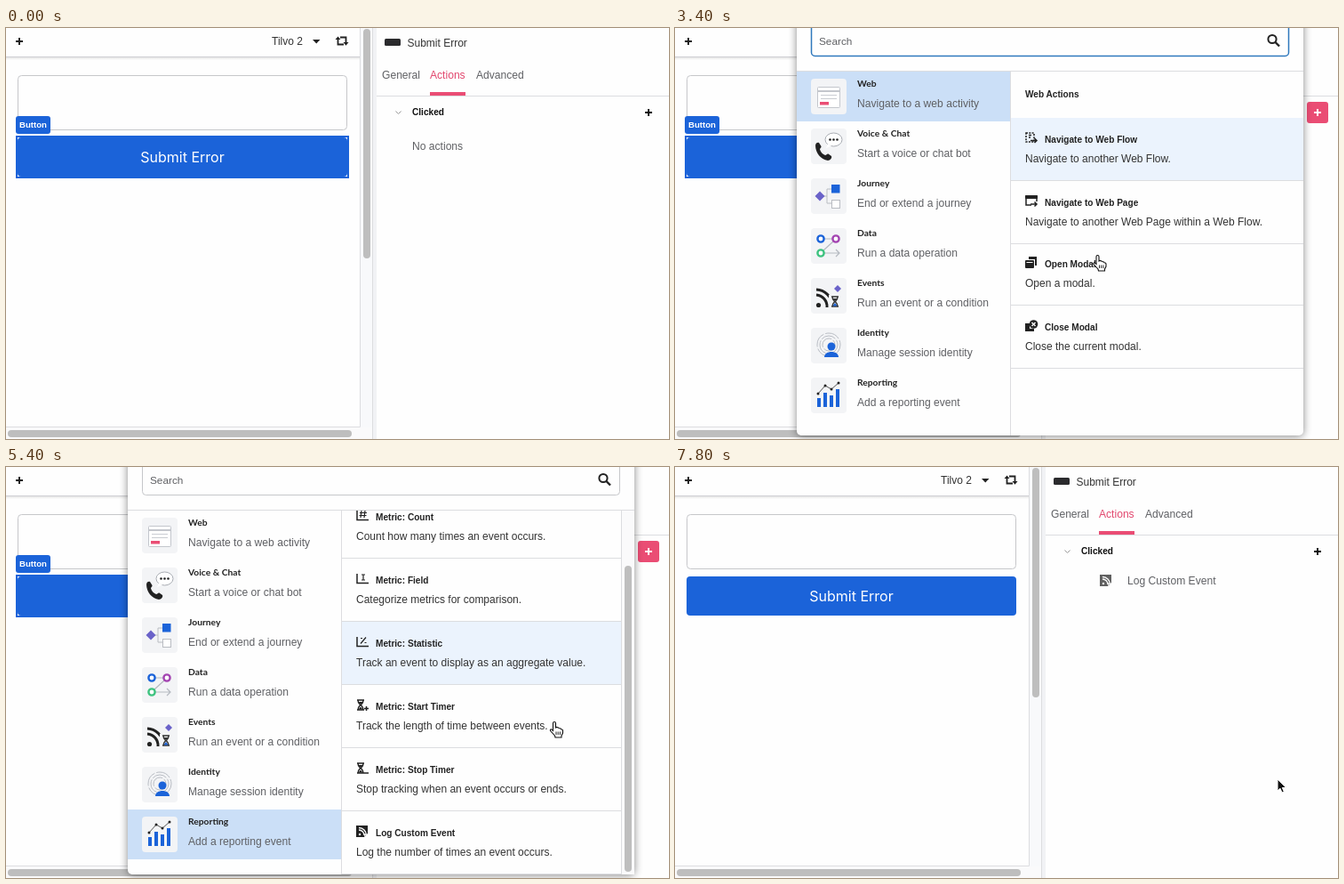
These frames come from a looping animation (746x462 px, 8000 ms). An HTML page:

```html
<!DOCTYPE html>
<html lang="en">
<head>
<meta charset="utf-8">
<title>Adding a log action</title>
<style>
  html, body { margin: 0; width: 100%; height: 100%; overflow: hidden; background: #fefefe; }
  svg { display: block; width: 746px; height: 462px; }
  text { font: 12.1px "Liberation Sans", Arial, sans-serif; fill: #333; white-space: pre; }
  .dim { fill: #5f6064; }
  .bold { font-weight: 700; font-size: 10.1px; fill: #222; }
  .small { font-size: 9.9px; fill: #616161; }
  .category { font: 700 10.3px Lato, sans-serif; fill: #222; }
  .button { font: 16px Inter, sans-serif; fill: #fff; text-anchor: middle; }
  .tag { font-weight: 700; font-size: 9.6px; fill: #fff; }
  .code { font: 11.8px "Liberation Mono", monospace; }
  .fx { font: italic 700 12px "Liberation Serif", serif; }
  .fx tspan { font: 700 8px "Liberation Sans", sans-serif; }
  .line { fill: none; stroke: #dcdde0; }
  .field { fill: #fefefe; stroke: #c6c7ca; }
  .ink { fill: none; stroke: #222; stroke-width: 1.5; }
  .thumb { fill: #bebebe; }
  .sheet { fill: #fefefe; filter: drop-shadow(0 1px 5px #0007); }
</style>
</head>
<body>
<svg id="stage" viewBox="0 0 746 462"></svg>
<script>
const LOOP = 8000, STEP = 200;
const OPEN = 2400, REPORTING = 3800, EDIT = 6200, DONE = 7400;
const BLUE = '#1b63d9', PINK = '#ea4d74', PURPLE = '#6a62c9';

const text = (x, y, s, cls = '', extra = '') => `<text x="${x}" y="${y}" class="${cls}" ${extra}>${s}</text>`;
const rect = (x, y, w, h, fill, r = 0, extra = '') =>
  `<rect x="${x}" y="${y}" width="${w}" height="${h}" rx="${r}" ${fill ? `fill="${fill}"` : ''} ${extra}/>`;
const path = (d, cls = 'ink', extra = '') => `<path d="${d}" class="${cls}" ${extra}/>`;
const shape = (d, fill = '#222') => `<path d="${d}" fill="${fill}"/>`;
const circle = (x, y, r, fill, extra = '') => `<circle cx="${x}" cy="${y}" r="${r}" fill="${fill}" ${extra}/>`;
const group = (id, body, extra = '') => `<g id="${id}" ${extra}>${body}</g>`;
const at = (x, y, body) => `<g transform="translate(${x} ${y})">${body}</g>`;
const plus = (x, y) => `M${x - 4} ${y}h8M${x} ${y - 4}v8`;
const stroke = (color, width = 1) => `style="stroke:${color};stroke-width:${width}"`;

const waves = color => path('M3 5a6 6 0 0 1 6 6M3 2.5a8.5 8.5 0 0 1 8.5 8.5', 'ink', stroke(color, 1.3)) + circle(4, 10, 1.2, color);
const logIcon = color => shape('M0 0H13V9L9 13H0Z', color) + waves('#fff') + shape('M9 13V9H13Z', '#ddd');
const hourglass = (color = '#222') =>
  path('M1 1H9M1 12H9M2 1C2 5 4.5 5 4.5 6.5S2 8 2 12M8 1C8 5 5.5 5 5.5 6.5S8 8 8 12', 'ink', stroke(color, 1.4)) +
  shape('M2.5 3H7.5L5 6ZM2.5 11.5L5 8.5 7.5 11.5Z', color);
const axis = glyph => path('M1 1V11.5H14') + path(glyph, 'ink', stroke('#222', 1.2));

const rowIcons = {
  flow: path('M1 1H10V11H1Z', 'ink', 'stroke-dasharray="2 1.3"') + path('M4 3.5h3M4 6h2') + path('M6 9.5H13M10.5 7L13 9.5 10.5 12'),
  page: path('M7 11H1V1H13V7') + rect(0, 0, 14, 4, '#222', 1) + path('M6 10H13M10.5 7.5L13 10 10.5 12.5'),
  modal: shape('M4 0H13V10H11V3H4Z') + rect(0, 4, 10, 9, '#222', 1) + path('M1.5 6.5h7', 'ink', stroke('#fff')),
  close: shape('M0 4H5V10H10V13H0Z') + circle(9.5, 5, 4.8, '#222') + path('M7.5 3l4 4m0-4l-4 4', 'ink', stroke('#fff', 1.4)),
  count: axis('M6 1L5 9M10 1L9 9M4 3.5h8M3.5 6.5h8'),
  field: axis('M6 2h4M8 2v6M6 8h4'),
  stat: axis('M11 1.5L5 8.5M5 2.5h2M9.5 7.5h2'),
  start: hourglass() + path('M9 10.5h5M11.5 8v5'),
  stop: hourglass() + path('M9 12h5'),
  log: logIcon('#222')
};

const categories = [
  ['Web', 'Navigate to a web activity',
    rect(7.5, 9.5, 25, 23, '#fff', 1, 'stroke="#c3c6cc"') + path('M8 14H32', 'line', stroke('#c3c6cc', 2)) +
    path('M11 18.5H29M11 22.5H29', 'line', stroke('#c9ccd2')) + rect(10, 26, 10, 3.5, PINK)],
  ['Voice &amp; Chat', 'Start a voice or chat bot',
    `<ellipse cx="25.5" cy="12.5" rx="9.5" ry="7.5" fill="#fff" stroke="#a9adb3"/>` + shape('M19 17l-2 5 6-2.5Z', '#fff') +
    [21.5, 25.5, 29.5].map(x => circle(x, 12.5, 1.3, '#222')).join('') +
    shape('M5 19C5 16 8 15 9 16L11.5 20C12 21.5 10 22 10 23.5 11 27 13.5 29 16 30 17.5 30 18 28 19.5 28.5L23 31C24 33 21.5 36 19 36 11 35 5 27 5 19Z')],
  ['Journey', 'End or extend a journey',
    path('M14 20H18M18 12V28M18 12H24M18 28H24', 'line', stroke('#b9bcc2')) + shape('M10 14.5L15.5 20 10 25.5 4.5 20Z', PURPLE) +
    rect(23, 7, 9.5, 9.5, BLUE) + rect(23.5, 24.5, 9, 9, '#fff', 0, 'stroke="#b9bcc2"')],
  ['Data', 'Run a data operation',
    path('M15 12H24M25 15L14 25M15 28H31M28 24L32 28 28 32', 'line', stroke('#b5b9c0', 1.2)) +
    [[11, 12, BLUE], [28, 12, '#a445b2'], [11, 28, '#3fc380']].map(([x, y, c]) => circle(x, y, 3.6, '#fff', `stroke="${c}" stroke-width="2.4"`)).join('')],
  ['Events', 'Run an event or a condition',
    path('M6 19A13 13 0 0 1 18 33M6 13A19 19 0 0 1 24 30', 'ink', stroke('#222', 3)) + circle(8.5, 30.5, 2.6, '#222') +
    rect(20, 19, 14, 16, '#f3f4f6') + shape('M30 8L34 12 30 16 26 12Z', PURPLE) + at(22, 20, hourglass('#333') + shape('M2.5 11.5L5 8 7.5 11.5Z', BLUE))],
  ['Identity', 'Manage session identity',
    [13, 10, 7].map(r => circle(20, 19, r, 'none', 'stroke="#b9bdc4" stroke-dasharray="17 2"')).join('') +
    circle(23, 21, 4.5, BLUE) + shape('M15 33C15 25 31 25 31 33Z', BLUE)],
  ['Reporting', 'Add a reporting event',
    [[7, 10], [14, 16], [21, 13], [28, 20]].map(([x, h]) => rect(x, 33 - h, 4, h, BLUE)).join('') +
    path('M8 18L16 9 23 13 31 6', 'ink', stroke('#555')) +
    [[8, 18], [16, 9], [23, 13], [31, 6]].map(([x, y]) => circle(x, y, 1.5, '#222')).join('')]
];

const webRows = [
  ['flow', 'Navigate to Web Flow', 'Navigate to another Web Flow.', 171],
  ['page', 'Navigate to Web Page', 'Navigate to another Web Page within a Web Flow.', 242],
  ['modal', 'Open Modal', 'Open a modal.', 311],
  ['close', 'Close Modal', 'Close the current modal.', 382]
];
const metricRows = [
  ['count', 'Metric: Count', 'Count how many times an event occurs.'],
  ['field', 'Metric: Field', 'Categorize metrics for comparison.'],
  ['stat', 'Metric: Statistic', 'Track an event to display as an aggregate value.'],
  ['start', 'Metric: Start Timer', 'Track the length of time between events.'],
  ['stop', 'Metric: Stop Timer', 'Stop tracking when an event occurs or ends.'],
  ['log', 'Log Custom Event', 'Log the number of times an event occurs.']
].map((row, i) => [...row, 171 + 71 * i]);

const actionList = (title, rows, right) => text(394, 78, title, 'bold') + rows.map(([icon, name, about, bottom], i) =>
  rect(378, i ? rows[i - 1][3] + 1 : 101, right - 378, bottom - (i ? rows[i - 1][3] + 1 : 101), '#ebf3fd', 0, 'class="hover"') +
  at(394, bottom - 54, rowIcons[icon]) + text(416, bottom - 42, name, 'bold') +
  text(394, bottom - 20, about, '', 'style="font-size:12px"') + path(`M378 ${bottom + .5}H${right}`, 'line')).join('');

const fieldBox = y => rect(88.5, y + .5, 303, 35, '', 3, 'class="field"') +
  `<text x="366" y="${y + 22}" class="fx">f<tspan dy="-1">(x)</tspan></text>`;

const page =
  rect(399, 0, 14, 462, '#f8f9fb') + rect(0, 449, 413, 13, '#fafafb') + rect(412, 0, 5, 462, '#f1f2f5') +
  path('M398.5 0V448.5H0M412.5 0V462', 'line') +
  rect(0, 32, 398, 4, 'url(#shade)') + path('M0 32.5H398', 'line', stroke('#cfcfd3')) +
  path(plus(15, 15), 'ink', stroke('#222', 2)) + text(299, 19, 'Tilvo 2', '', 'style="font-size:12px"') +
  shape('M345 13H353.5L349.2 17.5Z') +
  path('M373.5 12V18.5H380M382.5 17V10.5H376', 'ink', stroke('#222', 1.8)) + shape('M370.5 13L373.5 9.5 376.5 13ZM379.5 16H385.5L382.5 19.8Z') +
  rect(13.5, 53.5, 370, 61, '', 4, 'class="field"') + rect(13, 123, 371, 44, BLUE, 4) + text(198.5, 151, 'Submit Error', 'button') +
  group('selection', rect(12, 122, 373, 46, 'none', 0, `stroke="${BLUE}" stroke-width="2"`) + rect(11, 99, 39, 20, BLUE, 3) + text(15, 112, 'Button', 'tag')) +
  rect(402, 1, 8, 258, '', 4, 'class="thumb"') + rect(2, 452, 387, 8, '', 4, 'class="thumb"');

const panel =
  rect(426, 12, 18, 8, '#2b2b2d', 1.5) + text(451.5, 21, 'Submit Error', '', 'style="font-size:12px"') +
  text(423, 57, 'General', 'dim') + text(477, 57, 'Actions', '', 'style="fill:#e2466d"') + text(529, 57, 'Advanced', 'dim') +
  path('M417 76.5H746', 'line') + rect(477, 72, 40, 4, PINK) +
  path('M438.5 93.5L441.5 96.5 444.5 93.5', 'ink', stroke('#999')) + text(457, 98, 'Clicked', 'bold', 'style="fill:#111"') +
  rect(711, 83, 24, 24, PINK, 3, 'id="addBox"') + path(plus(723, 95), 'ink', `id="addSign" ${stroke('#111', 2)}`) +
  group('empty', text(457, 137, 'No actions', 'dim')) +
  group('chosen', rect(441, 113, 294, 29, '#cbdff7') + at(478, 121, logIcon(PINK)) + text(509, 132, 'Log Custom Event') +
    shape('M712 123h3l1-1h2l1 1h3v1.5h-10ZM713 125.5h8l-.6 8h-6.8Z')) +
  group('added', at(478, 121, logIcon('#606060')) + text(509, 132, 'Log Custom Event', 'dim'));

const picker =
  rect(137, -20, 570, 478, '', 5, 'class="sheet"') +
  rect(153.5, -9, 537, 40.5, '#fefefe', 4, 'id="search"') + text(162, 19, 'Search', 'dim', 'style="font-size:11.8px"') +
  circle(672, 12.5, 4.6, 'none', 'stroke="#222" stroke-width="2"') + path('M675.5 16L680 20.5', 'ink', stroke('#222', 2.4)) +
  rect(137, 49, 240, 56, '#cbdff7', 0, 'id="current"') +
  categories.map(([name, about, icon], i) => at(0, 56 * i,
    rect(153, 57, 40, 40, '#f3f4f6', 4) + at(153, 57, icon) + text(205, 66, name, 'category') + text(205, 89, about, 'dim'))).join('') +
  group('clipped',
    group('web', actionList('Web Actions', webRows, 707)) +
    group('metrics', group('scroller', actionList('Reporting Actions', metricRows, 692)) + rect(692, 49, 15, 409, '#fafafb') +
      path('M692.5 49V458', 'line') + rect(696, 52, 8, 344, '', 4, 'class="thumb" id="bar"')), 'clip-path="url(#list)"') +
  path('M137 48.5H707M377.5 49V458', 'line');

const editor =
  rect(63, -20, 350, 289, '', 5, 'class="sheet"') +
  text(87, 18, 'Event Message', 'small') + fieldBox(34) + text(97, 56, '"custom log"', 'code', 'style="fill:#1d4287"') +
  path('M87 83.5H393M87 172.5H393', 'line', stroke('#cbccd0')) +
  text(87, 107, 'Log Level', 'small') + text(96, 145, 'INFO', '', 'style="font-size:11.8px"') + shape('M142 139H150.5L146.2 143.5Z') +
  text(87, 196, 'Metadata', 'small') + fieldBox(212) + text(96, 234, '{}', 'code');

const pointers =
  group('arrow', path('M0 0V13L3 10.3 5 15 7.3 14 5.3 9.5H9.5Z', '', 'fill="#111" stroke="#fff"')) +
  group('hand', path('M-1.5 1a1.5 1.5 0 0 1 3 0V6L2.5 5.4 4.5 6 5 6.6 7 6.9 7.5 7.7 8.7 8 9.5 9V12L8 15V17H1L.5 15-4.5 9.5C-5 8-3.5 7.2-2.5 8.5L-1.5 9.5Z', '',
    'fill="#fff" stroke="#111" stroke-width="1.1"') + path('M2 10.5V14M4.2 10.5V14M6.4 10.5V14', 'ink', stroke('#111', .9)));

document.getElementById('stage').innerHTML =
  `<defs><linearGradient id="shade" x2="0" y2="1"><stop stop-color="#0002"/><stop offset="1" stop-color="#0000"/></linearGradient>
  <clipPath id="list"><path d="M137 49H707V458H137Z"/></clipPath></defs>` +
  rect(0, 0, 746, 462, '#fefefe') + page + panel + group('picker', picker) + group('editor', editor) + group('pointer', pointers);

const $ = id => document.getElementById(id);
const show = (id, on) => { $(id).style.display = on ? '' : 'none'; };
const set = (id, attrs) => Object.entries(attrs).forEach(([k, v]) => $(id).setAttribute(k, v));
const ease = p => p * p * (3 - 2 * p);
const progress = (t, from, to) => ease(Math.min(1, Math.max(0, (t - from) / (to - from))));

// time, x, y of the pointer tip
const route = [
  [200, 706, 390], [1000, 727, 130], [1400, 724, 100], [2400, 724, 100], [2800, 700, 112], [3000, 682, 116],
  [3800, 269, 396], [4200, 269, 396], [4800, 600, 220], [5200, 612, 225], [5400, 617, 287], [5800, 582, 414],
  [6600, 582, 414], [7400, 678, 351], [LOOP, 678, 351]
];
function pointerAt(t) {
  const i = Math.max(1, route.findIndex(stop => stop[0] >= t));
  const [t0, x0, y0] = route[i - 1], [t1, x1, y1] = route[i];
  const p = progress(t, t0, t1);
  return [x0 + (x1 - x0) * p, y0 + (y1 - y0) * p];
}

function draw(t) {
  const picking = t >= OPEN && t < EDIT, editing = t >= EDIT && t < DONE, reporting = t >= REPORTING;
  const [x, y] = pointerAt(t);
  const onAdd = t >= STEP && t < OPEN && x > 711 && x < 735 && y > 83 && y < 107;
  const inPicker = picking && x < 707 && y > 49;

  show('selection', t < EDIT);
  show('empty', t < EDIT);
  show('chosen', editing);
  show('added', t >= DONE);
  show('picker', picking);
  show('editor', editing);
  show('web', !reporting);
  show('metrics', reporting);

  show('addBox', onAdd || picking);
  set('addBox', { fill: onAdd ? '#f4aabd' : PINK });
  $('addSign').style.stroke = onAdd ? '#d02350' : picking ? '#fff' : '#111';
  set('search', { stroke: reporting ? '#c6c7ca' : '#2f78bd', 'stroke-width': reporting ? 1 : 1.5 });
  set('current', { y: reporting ? 385 : 49 });

  const scroll = 69 * progress(t, 4600, 5200);
  set('scroller', { transform: `translate(0 ${-scroll})` });
  set('bar', { y: 52 + scroll * 59 / 69 });

  // row highlight trails the pointer by one step
  const [hx, hy] = pointerAt(t - STEP);
  const listY = hy + scroll;
  const rows = reporting ? metricRows : webRows;
  const hovered = hx > 378 && hx < 707 && listY > 101 ? rows.findIndex(row => row[3] > listY) : -1;
  document.querySelectorAll(`#${reporting ? 'metrics' : 'web'} .hover`).forEach((r, i) => { r.style.opacity = +(i === hovered); });

  show('pointer', t >= STEP);
  show('hand', onAdd || inPicker);
  show('arrow', !(onAdd || inPicker));
  set('pointer', { transform: `translate(${x} ${y})` });
}

function tick() {
  draw(Math.floor(performance.now() % LOOP / STEP) * STEP);
  requestAnimationFrame(tick);
}
tick();
</script>
</body>
</html>
```
